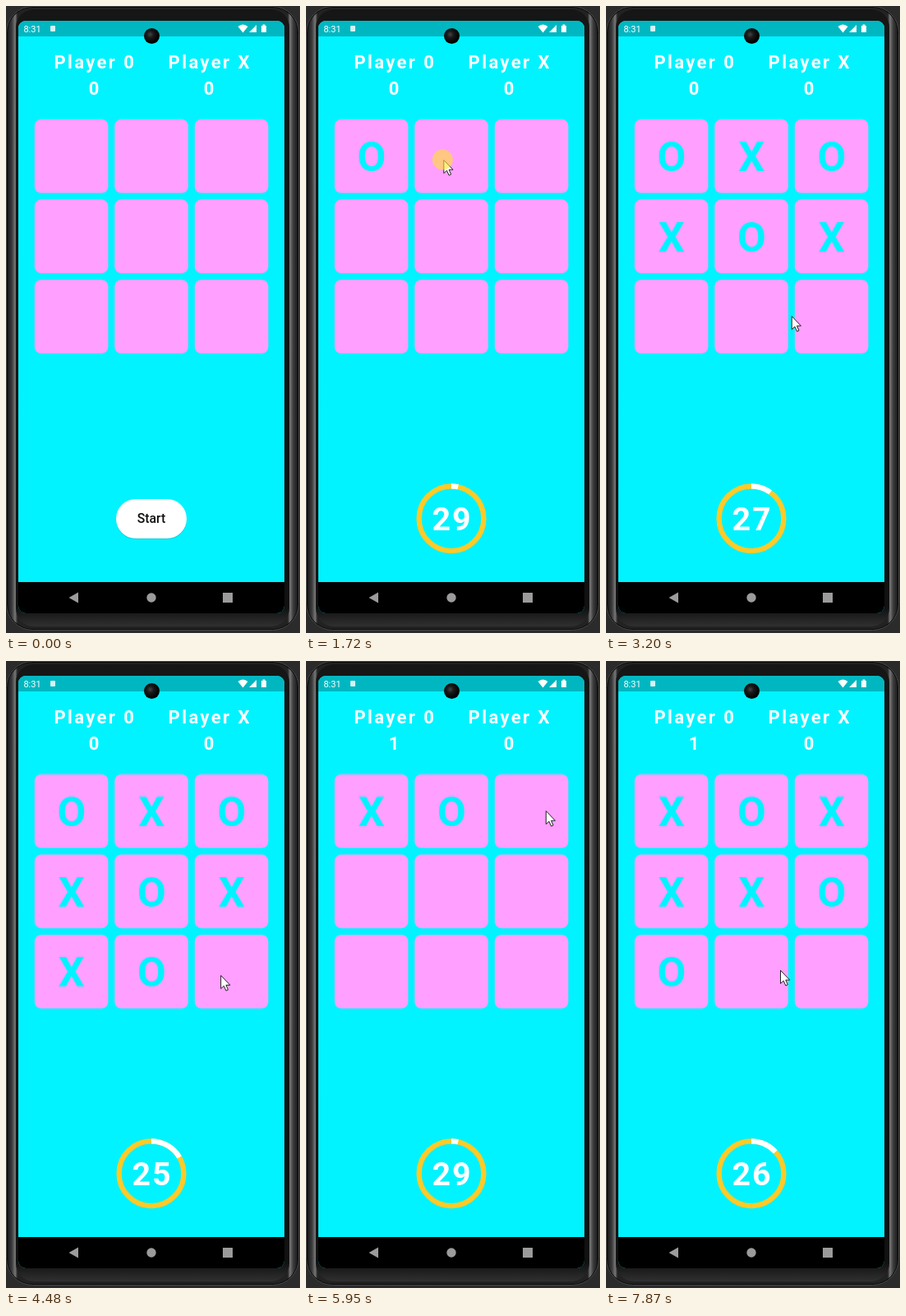
An HTML page that plays this animation: 358x763 px, repeating every 7.99 s.

```html
<!DOCTYPE html>
<html lang="en">
<head>
<meta charset="utf-8">
<title>Tic-tac-toe</title>
<style>
html, body { margin: 0; width: 100%; height: 100%; overflow: hidden; background: #2b2b2b; }
svg { display: block; width: 358px; height: 763px; }
text { font-family: Roboto, sans-serif; fill: #fff; text-anchor: middle; }
.head { font-size: 22px; font-weight: 700; letter-spacing: 2.4px; }
.mark { font-size: 50.4px; font-weight: 700; fill: #00f3ff; }
.count { font-size: 39.4px; font-weight: 700; letter-spacing: 2px; }
.label { font-size: 15.8px; font-weight: 500; fill: #111; }
.ring { fill: none; stroke-width: 6.3px; }
</style>
</head>
<body>
<svg viewBox="0 0 358 763">
  <defs>
    <linearGradient id="side">
      <stop offset="0" stop-color="#1a1a1a"/><stop offset=".015" stop-color="#3c3c3c"/>
      <stop offset=".026" stop-color="#777"/><stop offset=".034" stop-color="#222"/>
      <stop offset=".966" stop-color="#222"/><stop offset=".974" stop-color="#777"/>
      <stop offset=".985" stop-color="#3c3c3c"/><stop offset="1" stop-color="#1a1a1a"/>
    </linearGradient>
    <linearGradient id="edge" x2="0" y2="1">
      <stop offset="0" stop-color="#161616"/><stop offset=".97" stop-color="#111"/>
      <stop offset="1" stop-color="#303030"/>
    </linearGradient>
    <radialGradient id="lens" cx=".4" cy=".4">
      <stop offset="0" stop-color="#444"/><stop offset=".45" stop-color="#181818"/><stop offset="1" stop-color="#050505"/>
    </radialGradient>
    <radialGradient id="press">
      <stop offset="0" stop-color="#d9d5e6"/><stop offset="1" stop-color="#d9d5e6" stop-opacity="0"/>
    </radialGradient>
    <clipPath id="screen"><rect x="15" y="18" width="324" height="721" rx="9"/></clipPath>
  </defs>

  <rect x=".5" y=".5" width="356" height="759" rx="32" fill="#080808" stroke="#484848"/>
  <rect x="2" y="2" width="353" height="756" rx="30" fill="url(#side)"/>
  <rect x="12" y="4" width="333" height="751" rx="22" fill="url(#edge)"/>

  <g clip-path="url(#screen)">
    <rect x="15" y="18" width="324" height="721" fill="#00f3ff"/>
    <rect x="15" y="18" width="324" height="19" fill="#00b7c1"/>
    <rect x="15" y="701" width="324" height="38"/>
  </g>
  <text x="32" y="32" font-size="11">8:31</text>
  <rect x="54" y="24" width="6" height="7" rx="1" fill="#d5f3f5"/>
  <path d="M282.500 25Q288.500 20 294.500 25L288.500 32.500ZM305 23V32H296ZM311 24H312.500V22.500H315.500V24H317V32H311Z" fill="#fff"/>
  <path d="M88 713.500V726.500L76.500 720ZM264 714H276V726H264Z" fill="#9b9b9b"/>
  <circle cx="177" cy="720" r="5.700" fill="#9b9b9b"/>
  <circle cx="177.500" cy="36.500" r="9.500" fill="url(#lens)"/>

  <g class="head">
    <text x="108.300" y="76">Player 0</text><text x="248.200" y="76">Player X</text>
    <text id="score" x="108.200" y="107.500">0</text><text x="248.200" y="107.500">0</text>
    <text id="wins" x="178.700" y="584">Player O Wins!</text>
  </g>
  <g id="board"></g>

  <g id="timer">
    <circle class="ring" cx="177" cy="623.700" r="39.400" stroke="#ffca28"/>
    <path id="arc" class="ring" stroke="#fff"/>
    <text id="count" class="count" x="178" y="638"></text>
  </g>
  <g id="button">
    <rect class="pill" y="601" height="48" rx="24" fill="#00a9b5" opacity=".5"/>
    <rect id="face" class="pill" y="600" height="48" rx="24"/>
    <ellipse id="ripple" cx="203" cy="623" rx="38" ry="24" fill="url(#press)"/>
    <text id="label" class="label" x="177" y="629"></text>
  </g>

  <g id="pointer">
    <path d="M.500.500V16.500L4.200 13.200L6.800 19L9.300 17.900L6.800 12.200H11.700Z" fill="#fff" stroke="#222"/>
    <circle id="tap" cx="-1" r="12.500" fill="#ffe32f" fill-opacity=".6"/>
  </g>
</svg>
<script>
const LOOP = 7990, TICK = 610, WIN = 4560, ENTER = 160;
const $ = id => document.getElementById(id);
const show = (el, on) => el.style.display = on ? '' : 'none';
const set = (el, attrs) => Object.entries(attrs).forEach(([k, v]) => el.setAttribute(k, v));

// Cells are named by digit in order of play; each time is the moment its mark appears.
const games = [
  { start: 1000, press: 640, first: 'O', cells: '012345768', times: [1460, 1770, 2040, 2460, 2760, 3060, 3480, 3980, WIN] },
  { start: 5135, press: 4960, first: 'X', cells: '0125463', times: Array.from({ length: 7 }, (_, k) => 5530 + 305 * k) }
];
const winners = [0, 4, 8];

const cellAt = i => [34.8 + i % 3 * 97.5, 138 + Math.floor(i / 3) * 97.6];
const cells = Array.from({ length: 9 }, (_, i) => {
  const [x, y] = cellAt(i);
  $('board').insertAdjacentHTML('beforeend',
    `<rect x="${x}" y="${y}" width="89.6" height="89.6" rx="8"/><text class="mark" x="${x + 45}" y="${y + 63}"></text>`);
  const text = $('board').lastChild;
  return { text, rect: text.previousSibling };
});

// The pointer rests on each thing it clicks and glides between; a few stops bend its way.
const rest = (t, x, y) => [[t - 70, x, y], [t + 30, x, y]];
const clicks = games.flatMap(g => [...g.times.keys()].map(k => {
  const [x, y] = cellAt(+g.cells[k]);
  return [g.times[k], x + 35, y + 49];
}));
games.forEach(g => clicks.push([g.press, 204, 621]));
const path = [
  [ENTER, 314, 730], [920, 70, 238], [3200, 226, 377], [5110, 212, 474], [5950, 292, 182],
  [7590, 158, 376], [7800, 158, 376], [7870, 212, 376], [LOOP, 212, 376],
  ...clicks.flatMap(c => rest(...c))
].sort((a, b) => a[0] - b[0]);

function pointerAt(t) {
  const i = path.findIndex(p => p[0] > t);
  const [t0, x0, y0] = path[i - 1], [t1, x1, y1] = path[i];
  const k = (t - t0) / (t1 - t0);
  return [x0 + (x1 - x0) * k, y0 + (y1 - y0) * k];
}

function drawTimer(elapsed) {
  const ticks = Math.floor(elapsed / TICK), a = ticks * Math.PI / 15, r = 39.4;
  $('count').textContent = 30 - ticks;
  set($('arc'), { d: `M177 ${623.7 - r}A${r} ${r} 0 0 1 ${177 + r * Math.sin(a)} ${623.7 - r * Math.cos(a)}` });
}

function drawButton(label, width, age) {
  const fade = age > 0 ? Math.max(0, 1 - age / 350) : 0;
  document.querySelectorAll('.pill').forEach(p => set(p, { x: 177 - width / 2, width }));
  set($('face'), { fill: fade ? '#f7f6fc' : '#fff' });
  set($('ripple'), { rx: width / 2 - 26, opacity: fade });
  $('label').textContent = label;
}

function draw(t) {
  const [one, two] = games, game = t < two.start ? one : two;
  const won = t >= WIN && game === one;
  const playing = t >= game.start && !won;

  cells.forEach(({ text, rect }, i) => {
    const turn = game.cells.indexOf(i);
    const isO = (turn % 2 === 0) === (game.first === 'O');
    text.textContent = t >= game.times[turn] ? (isO ? 'O' : 'X') : '';
    set(rect, { fill: won && winners.includes(i) ? '#ffca28' : '#ff9fff' });
  });
  $('score').textContent = t >= WIN ? 1 : 0;
  show($('wins'), won);
  show($('timer'), playing);
  show($('button'), !playing);

  if (playing) drawTimer(t - game.start);
  else if (won) drawButton('Play Again!', 130, t - two.press);
  else drawButton('Start', 86, t - one.press);

  show($('pointer'), t >= ENTER);
  show($('tap'), clicks.some(([c]) => t >= c - 65 && t < c + 15));
  if (t >= ENTER) set($('pointer'), { transform: `translate(${pointerAt(t)})` });
}

function frame() {
  draw(performance.now() % LOOP);
  requestAnimationFrame(frame);
}
frame();
</script>
</body>
</html>
```
